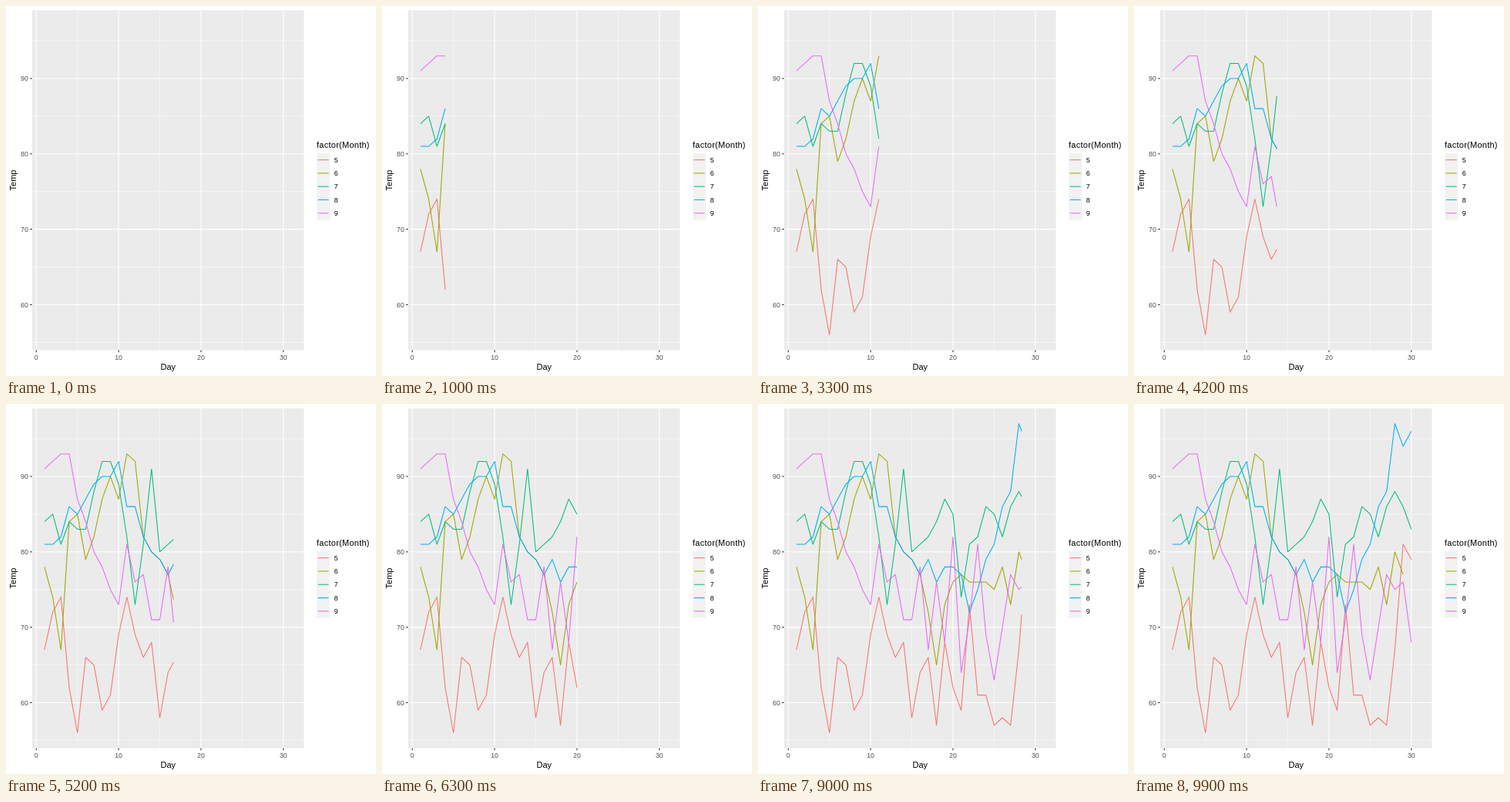
An HTML page for the animation above (10 s loop, 480 by 480 pixels).

```html
<!DOCTYPE html>
<html lang="en">
<head>
<meta charset="utf-8">
<title>Temperature by day</title>
<style>
  html, body { margin: 0; width: 100%; height: 100%; overflow: hidden; background: #fff; }
  svg { display: block; width: 480px; height: 480px; }
  text { font: 8.8px "Liberation Sans", Arial, sans-serif; }
  .title { font-size: 11px; }
  .wide { letter-spacing: .26px; }
  .tick { fill: #4d4d4d; }
  .mid { text-anchor: middle; }
  .end { text-anchor: end; }
  .series { fill: none; stroke-width: 1.07; stroke-linejoin: round; }
</style>
</head>
<body>
<svg id="chart" viewBox="0 0 480 480"></svg>
<script>
const STEP = 100, STEPS = 100, LAST = STEPS - 1;
const panel = { left: 33.9, top: 5.5, right: 386.5, bottom: 446.6 };
const chart = document.getElementById("chart");
const series = [];

const px = day => panel.left + (day + 0.5) / 33 * (panel.right - panel.left);
const py = temp => panel.top + (99.05 - temp) / 45.1 * (panel.bottom - panel.top);

function add(tag, attrs, content = "") {
  const el = document.createElementNS("http://www.w3.org/2000/svg", tag);
  for (const key in attrs) el.setAttribute(key, attrs[key]);
  el.textContent = content;
  return chart.appendChild(el);
}

function line(x1, y1, x2, y2, stroke, width = 1.07) {
  add("line", { x1, y1, x2, y2, stroke, "stroke-width": width });
}

function label(content, x, y, cls = "", extra = {}) {
  add("text", { x, y, class: cls, ...extra }, content);
}

const vertical = (day, width) => line(px(day), panel.top, px(day), panel.bottom, "#fff", width);
const horizontal = (temp, width) => line(panel.left, py(temp), panel.right, py(temp), "#fff", width);

function drawAxes() {
  add("rect", {
    x: panel.left, y: panel.top, fill: "#ebebeb",
    width: panel.right - panel.left, height: panel.bottom - panel.top
  });
  [55, 65, 75, 85, 95].forEach(t => horizontal(t, 0.53));
  [5, 15, 25].forEach(d => vertical(d, 0.53));
  [60, 70, 80, 90].forEach(t => {
    horizontal(t, 1.07);
    line(panel.left - 2.75, py(t), panel.left, py(t), "#333");
    label(t, 28.9, py(t) + 3.2, "tick end");
  });
  [0, 10, 20, 30].forEach(d => {
    vertical(d, 1.07);
    line(px(d), panel.bottom, px(d), panel.bottom + 2.75, "#333");
    label(d, px(d), 459.2, "tick mid");
  });
  label("Day", 210.3, 472, "title mid");
  label("Temp", 13.3, 226, "title mid", { transform: "rotate(-90 13.3 226)" });
  label("factor(Month)", 403, 184, "title wide");
}

function addSeries(month, color, temps) {
  const keyTop = 191 + (month - 5) * 17.28, mid = keyTop + 8.64;
  add("rect", { x: 403, y: keyTop, width: 17.28, height: 17.28, fill: "#f2f2f2" });
  line(404.7, mid, 418.6, mid, color);
  label(month, 425.8, mid + 3.2);
  series.push({ month, temps, path: add("path", { class: "series", stroke: color }) });
}

function halfEven(v) {
  const low = Math.floor(v);
  return v - low === 0.5 ? low + low % 2 : Math.round(v);
}

// Each day arrives on a whole step; steps between two days are linear.
const arrival = i => halfEven(i * 33 / 10);

function dayIndexAt(step) {
  let i = 0;
  while (i < 29 && arrival(i + 1) <= step) i++;
  return i + (step - arrival(i)) / (arrival(i + 1) - arrival(i));
}

function pathAt({ month, temps }, step) {
  const final = temps.length - 1;
  let reach = Math.min(dayIndexAt(step), final);
  // A finished line loses its closing point, except the last month.
  if (reach === final && month < 9) reach = final - 1;
  const whole = Math.floor(reach), part = reach - whole;
  const points = temps.slice(0, whole + 1).map((t, i) => [i + 1, t]);
  if (part > 0) points.push([reach + 1, temps[whole] + part * (temps[whole + 1] - temps[whole])]);
  if (points.length < 2) return "";
  return "M" + points.map(([d, t]) => px(d).toFixed(2) + " " + py(t).toFixed(2)).join("L");
}

drawAxes();
addSeries(5, "#f8766d", [67, 72, 74, 62, 56, 66, 65, 59, 61, 69, 74, 69, 66, 68, 58, 64,
  66, 57, 68, 62, 59, 73, 61, 61, 57, 58, 57, 67, 81, 79, 76]);
addSeries(6, "#a3a500", [78, 74, 67, 84, 85, 79, 82, 87, 90, 87, 93, 92, 82, 80, 79, 77,
  72, 65, 73, 76, 77, 76, 76, 76, 75, 78, 73, 80, 77, 83]);
addSeries(7, "#00bf7d", [84, 85, 81, 84, 83, 83, 88, 92, 92, 89, 82, 73, 81, 91, 80, 81,
  82, 84, 87, 85, 74, 81, 82, 86, 85, 82, 86, 88, 86, 83, 81]);
addSeries(8, "#00b0f6", [81, 81, 82, 86, 85, 87, 89, 90, 90, 92, 86, 86, 82, 80, 79, 77,
  79, 76, 78, 78, 77, 72, 75, 79, 81, 86, 88, 97, 94, 96, 94]);
addSeries(9, "#e76bf3", [91, 92, 93, 93, 87, 84, 80, 78, 75, 73, 81, 76, 77, 71, 71, 78,
  67, 76, 68, 82, 64, 71, 81, 69, 63, 70, 77, 75, 76, 68]);

const start = performance.now();
let shown = -1;

function tick() {
  const step = Math.min(LAST, Math.floor((performance.now() - start) / STEP % STEPS));
  if (step !== shown) {
    series.forEach(s => s.path.setAttribute("d", pathAt(s, step)));
    shown = step;
  }
  requestAnimationFrame(tick);
}
tick();
</script>
</body>
</html>
```
